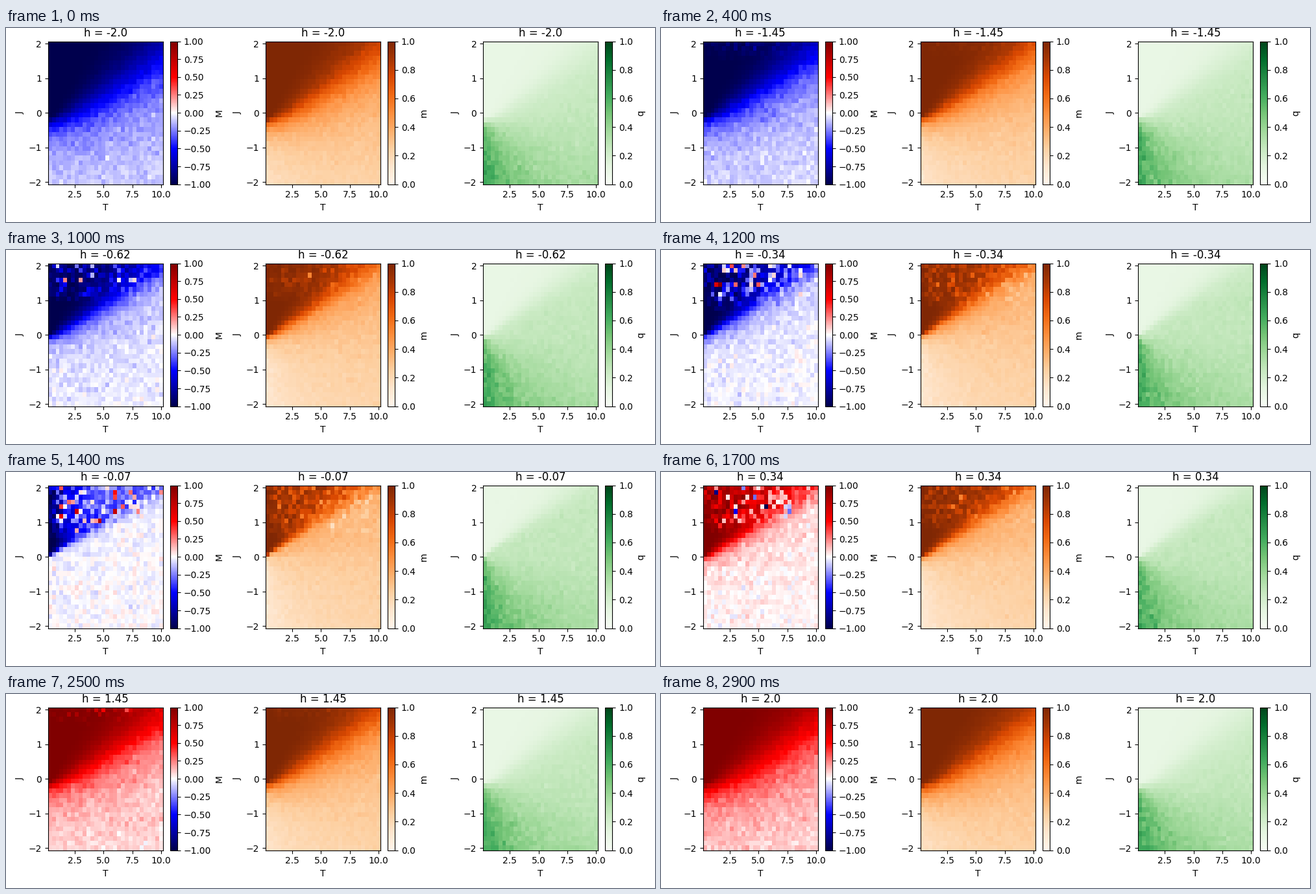
Animation of 1000 by 300 pixels, one loop 3000 ms. Source, as a matplotlib script:

```python
import numpy as np
import matplotlib.pyplot as plt
from matplotlib.animation import FuncAnimation

FRAMES, SIZE = 30, 30
fields = np.linspace(-2, 2, FRAMES)
temps = np.linspace(1 / 3, 10, SIZE)
couplings = np.linspace(-2, 2, SIZE)
T, J = np.meshgrid(temps, couplings)


def mean_field(h):
    """Damped solution of x = tanh((h + z J x) / T)."""
    z = np.where(J > 0, 5, 6 + 3 * np.exp(-T / 3))
    x = np.full_like(T, np.sign(h))
    for _ in range(350):
        x += 0.03 * (np.tanh((h + z * J * x) / T) - x)
    return x


def order_parameters(frame):
    rng = np.random.default_rng(100 + frame)
    h = fields[frame]
    strength = abs(h)
    mean = mean_field(h)
    ratio = np.abs(J) / T
    free = 1 - mean**2

    # Finite-size fluctuations set |M| in the disordered phase.
    spread = np.where(J > 0, 0.28 + 0.6 * ratio, 0.1 + 0.18 / (1 + 2 * ratio))
    m = np.sqrt(mean**2 + (spread * np.sqrt(free))**2)
    frustration = ratio**1.5 / (ratio**1.5 + 0.4)
    q_free = 0.285 + np.where(J < 0, 0.36 * frustration, 0)
    q = 0.1 + (q_free - 0.1) * (1 - m**2)

    # Runs trapped in the wrong domain weaken the ordered phase at low field.
    trapped = np.clip((J - 0.45 - 0.75 * strength) / 0.6, 0, 1)
    trapped *= 0.6 * np.exp(-strength / 0.8) * np.clip(T / 1.3, 0.15, 1)
    flips = 1 - (1 - np.tanh(25 * strength / T)) * mean**2
    M = mean * flips * (1 - trapped * rng.exponential(1, T.shape))
    m *= 1 - 0.3 * trapped * rng.gamma(2, 0.5, T.shape)

    M += 0.035 * free * rng.standard_normal(T.shape)
    m += (0.01 + 0.045 * m**2) * free * rng.standard_normal(T.shape)
    q += 0.1 * q**1.6 * (1 - m**2) * rng.standard_normal(T.shape)
    return np.clip(M, -1, 1), np.clip(m, 0, 1), np.clip(q, 0, 1)


states = [order_parameters(i) for i in range(FRAMES)]

fig, axes = plt.subplots(1, 3, figsize=(10, 3), dpi=100)
panels = [("M", "seismic", -1, 0.25), ("m", "Oranges", 0, 0.2),
          ("q", "Greens", 0, 0.2)]
meshes = []
for ax, (name, cmap, low, step), data in zip(axes, panels, states[0]):
    mesh = ax.pcolormesh(temps, couplings, data, cmap=cmap,
                         vmin=low, vmax=1, shading="nearest")
    fig.colorbar(mesh, ax=ax, label=name,
                 ticks=np.arange(low, 1 + step / 2, step))
    ax.set_xticks(np.arange(2.5, 10.1, 2.5))
    ax.set_xlabel("T")
    ax.set_ylabel("J")
    meshes.append(mesh)
fig.tight_layout()
titles = [ax.set_title("", pad=5.3) for ax in axes]


def update(frame):
    for mesh, title, data in zip(meshes, titles, states[frame]):
        mesh.set_array(data)
        title.set_text(f"h = {round(float(fields[frame]), 2)}")
    return meshes + titles


anim = FuncAnimation(fig, update, frames=FRAMES, interval=100,
                     repeat=True, repeat_delay=0, blit=False)
plt.show()
```
